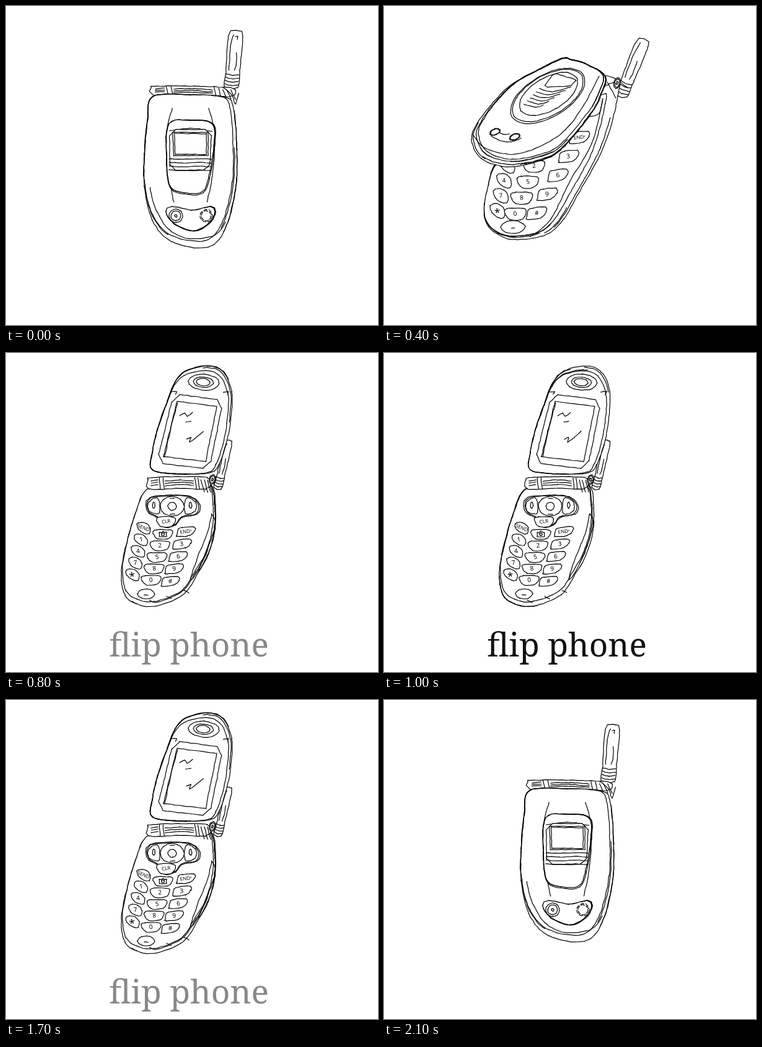
Recreate the animation shown at these times as an HTML page with a canvas. Size 600x514 px, loop 2.2 s.

```html
<!DOCTYPE html>
<html>
<head>
<meta charset="utf-8">
<style>
html, body { margin: 0; width: 100%; height: 100%; overflow: hidden; background: #fff; }
canvas { display: block; }
</style>
</head>
<body>
<canvas id="stage" width="600" height="514"></canvas>
<script>
const ctx = document.getElementById('stage').getContext('2d');
const LOOP = 2200, STEP = 100;
let seed = 1, matrix = new DOMMatrix();

const lerp = (a, b, t) => a + (b - a) * t;
function random() {
  seed = seed * 16807 % 2147483647;
  return seed / 2147483647;
}
const jitter = amount => (random() * 2 - 1) * amount;

// Samples a curve through flat x, y values; bend 0 keeps corners sharp.
function sample(p, closed, bend) {
  const n = p.length / 2, out = [];
  const at = (i, k) => p[(closed ? (i + n) % n : Math.max(0, Math.min(n - 1, i))) * 2 + k];
  for (let i = 0; i < (closed ? n : n - 1); i++) {
    const steps = Math.max(2, Math.round(Math.hypot(at(i + 1, 0) - at(i, 0), at(i + 1, 1) - at(i, 1)) / 6));
    for (let s = 0; s <= steps; s++) {
      const t = s / steps;
      out.push([0, 1].map(k => {
        const a = at(i, k), b = at(i + 1, k);
        const u = (b - at(i - 1, k)) / 2, v = (at(i + 2, k) - a) / 2;
        const arc = a + u * t + (3 * (b - a) - 2 * u - v) * t * t + (2 * (a - b) + u + v) * t ** 3;
        return lerp(lerp(a, b, t), arc, bend);
      }));
    }
  }
  return out;
}

function ink(points, closed) {
  ctx.setTransform(matrix);
  ctx.beginPath();
  for (const [x, y] of points) ctx.lineTo(x + jitter(.5), y + jitter(.5));
  if (closed) ctx.closePath();
  ctx.resetTransform();
  if (closed) ctx.fill();
  ctx.stroke();
}
const line = (...p) => ink(sample(p, false, 1), false);
const loop = (...p) => ink(sample(p, true, 1), true);
const poly = (...p) => ink(sample(p, true, 0), true);

const scaled = (points, k, [ax, ay]) => points.map(([x, y]) => [lerp(ax, x, k), lerp(ay, y, k)]);

// A thick shell: outline, an edge shrunk towards the first point, and loose pen strands between.
function shell(k, strands, ...p) {
  const edge = sample(p, true, 1), n = edge.length;
  ink(edge, true);
  ink(scaled(edge, k, edge[0]), true);
  for (let i = 0; i < strands; i++) {
    const from = Math.floor(random() * n), length = Math.floor(n * (.1 + random() * .2));
    const part = [...edge, ...edge].slice(from, from + length);
    ink(scaled(part, lerp(k, 1.005, random()), edge[0]), false);
  }
}

function oval(x, y, rx, ry = rx, turn = 0) {
  const p = [];
  for (let a = 0; a < 6.2; a += Math.PI / 4) {
    const u = rx * Math.cos(a), v = ry * Math.sin(a);
    p.push(x + u * Math.cos(turn) - v * Math.sin(turn), y + u * Math.sin(turn) + v * Math.cos(turn));
  }
  loop(...p);
}

// Four corners, enlarged about their centre, with corners cut by a share of each side.
function pane(corners, grow = 1, cut = 0) {
  const pts = [0, 2, 4, 6].map(i => corners.slice(i, i + 2));
  const mid = [0, 1].map(k => pts.reduce((sum, q) => sum + q[k], 0) / 4);
  const big = scaled(pts, grow, mid);
  poly(...big.flatMap((q, i) => {
    const prev = big[(i + 3) % 4], next = big[(i + 1) % 4];
    return cut ? [...scaled([prev, next], cut, q).flat()] : q;
  }));
}

function antenna(x0, y0, x1, y1, width) {
  const length = Math.hypot(x1 - x0, y1 - y0), ux = (x1 - x0) / length, uy = (y1 - y0) / length;
  const at = (t, side) => [x0 + ux * t * length - uy * side * width, y0 + uy * t * length + ux * side * width];
  loop(...at(0, -.5), ...at(.25, -.48), ...at(.9, -.5), ...at(1, -.2), ...at(1, .25), ...at(.92, .5), ...at(.3, .48), ...at(0, .4));
  line(...at(.93, -.15), ...at(.7, -.3), ...at(.3, -.28));
  line(...at(.62, .15), ...at(.4, .2), ...at(.3, .1));
  for (let t = .05; t < .25; t += .06) line(...at(t, -.5), ...at(t - .02, 0), ...at(t, .45));
}

function hinge(x0, y0, x1, y1, h) {
  const at = (t, v) => [lerp(x0, x1, t), lerp(y0, y1, t) + h * v];
  loop(...at(0, .15), ...at(.05, 0), ...at(.5, -.1), ...at(.95, 0), ...at(1, .5), ...at(.93, 1), ...at(.5, .95), ...at(.02, 1));
  for (const t of [.18, .24, .75, .8]) line(...at(t, 0), ...at(t + .02, 1));
  for (const v of [.3, .5, .7]) {
    line(...at(.27, v), ...at(.5, v - .1), ...at(.73, v));
    line(...at(.05, v), ...at(.16, v - .1));
  }
  for (const t of [.85, .9, .95]) line(...at(t, .2), ...at(t + .05, 1.3));
}

function knob(x, y, rx, ry) {
  for (const k of [1, .75, .3]) oval(x, y, rx * k, ry * k, .25);
}

const keyShapes = [
  [-.5, -.35, -.2, -.5, .2, -.4, .5, 0, .42, .5, 0, .45, -.4, .1],
  [-.5, -.3, -.3, -.48, .3, -.48, .5, -.3, .43, .2, .22, .5, -.25, .5, -.45, .1],
  [-.43, -.25, -.2, -.42, .46, -.5, .5, -.1, .2, .38, -.46, .5, -.5, .35]
];

function key(shape, x, y, w, h, label) {
  loop(...keyShapes[shape].map((v, i) => i % 2 ? y + v * h : x + v * w));
  if (label == 'camera') {
    poly(x - 6, y - 3, x - 2, y - 3, x, y - 5, x + 3, y - 3, x + 6, y - 3, x + 6, y + 4, x - 6, y + 4);
    oval(x, y, 2.2);
    return;
  }
  ctx.setTransform(matrix);
  ctx.translate(x + jitter(.5), y + (label == '*' ? 4 : 0));
  ctx.rotate(label == 'SEND' ? .4 : -.12);
  ctx.font = `500 ${label == '*' ? 17 : label.length > 1 ? 8 : 10}px "Noto Sans", sans-serif`;
  ctx.fillStyle = '#000';
  ctx.fillText(label, 0, 0);
  ctx.fillStyle = '#fff';
  ctx.resetTransform();
}

// Five rows of three keys between the places of the top row and those of the bottom row.
function keypad(top, bottom, w, h, firstRow = 0) {
  const labels = ['SEND', 'camera', 'ENDᵛ', ...'123456789*0#'];
  labels.forEach((label, i) => {
    const c = i % 3, row = (i - c) / 3;
    if (row < firstRow && c < 2) return;
    const [x, y] = [0, 1].map(k => lerp(top[c * 2 + k], bottom[c * 2 + k], row / 4));
    key(c, x, y, w * [.67, 1, .9][c], h * [1.15, .95, 1][c], label);
  });
}

function minusKey(x, y, w, h) {
  loop(x - w, y, x - w / 2, y - h, x + w / 2, y - h, x + w, y, x + w / 2, y + h, x - w / 2, y + h);
  line(x - 3, y + 2, x + 3, y + 2);
}

function navigation(x, y, w, h) {
  const shape = [-.95, -.1, -.8, -.8, 0, -1, .7, -.85, 1, -.1, .9, .7, .35, 1, .12, 1.7, -.3, 1.85, -.55, 1, -.85, .6];
  const edge = sample(shape.map((v, i) => i % 2 ? y + v * h : x + v * w), true, 1);
  ink(edge, true);
  ink(scaled(edge, .95, [x, y]), true);
  for (const side of [-1, 1]) {
    const at = (u, v) => [x + side * u * w, y + v * h];
    loop(...at(.84, -.4), ...at(.55, -.8), ...at(.45, -.3), ...at(.45, .5), ...at(.55, .7), ...at(.84, .4));
    oval(...at(.66, -.1), 2, 5);
    line(...at(.3, -.2), ...at(.3, .2));
  }
  oval(x, y, w * .43, h * .88);
  for (const v of [-.7, .7]) line(x - 3, y + v * h, x + 4, y + v * h);
  oval(x, y, w * .15, h * .36);
  key(1, x - w * .22, y + h * 1.38, w * .68, h * .9, 'CLR');
}

function earpiece(x, y, w, h) {
  for (const k of [1, .65, .45]) oval(x - 2 * (1 - k), y, w * k, h * k, .07);
}

function glints(x, y) {
  line(x, y, x + 8, y - 4, x + 12, y + 1, x + 21, y - 5);
  line(x + 10, y + 10, x + 18, y + 9);
  line(x + 11, y + 38, x + 18, y + 35, x + 16, y + 43, x + 27, y + 35, x + 38, y + 25);
}

const closed = {
  pivot: [295, 260],
  body() {
    antenna(364, 131, 371, 40, 23);
    line(370, 49, 374, 49, 373, 54);
    hinge(234, 129, 370, 132, 14);
    line(350, 131, 364, 143, 370, 158, 375, 140);
    shell(.955, 5, 237, 146, 228, 185, 223, 240, 223, 290, 236, 345, 268, 380, 325, 389, 354, 358,
      371, 290, 372, 220, 366, 160, 350, 146, 300, 143);
    for (const [x, side] of [[268, -1], [327, 1]]) line(x, 165, x + side * 9, 200, x + side * 9, 240, x + side * 3, 290, x - side * 3, 316);
    shell(.98, 5, 263, 190, 298, 184, 334, 190, 337, 225, 328, 278, 318, 301, 295, 304, 265, 293, 259, 240);
    line(264, 201, 298, 197, 333, 202);
    pane([264, 199, 332, 199, 328, 265, 264, 265], 1, .15);
    const screen = [269, 203, 326, 204, 326, 241, 270, 241];
    pane(screen);
    pane(screen, .9);
    for (let y = 246; y < 266; y += 6) line(263, y, 285, y + 1, 310, y, 331, y + 1);
    shell(.98, 3, 258, 331, 268, 323, 301, 329, 330, 323, 338, 331, 330, 349, 303, 363, 270, 350);
    for (const r of [11, 8, 2]) oval(274, 338, r);
    ctx.setLineDash([6, 3]);
    oval(323, 338, 10);
    oval(323, 338, 8);
    ctx.setLineDash([]);
    line(232, 292, 242, 328, 263, 360, 295, 375, 337, 369, 354, 348);
  },
  lid() {}
};

const half = {
  pivot: [350, 120],
  body() {
    antenna(383, 144, 419, 54, 21);
    shell(.9, 7, 162, 320, 164, 347, 180, 366, 205, 376, 240, 374, 268, 365, 290, 343, 312, 305,
      355, 225, 378, 140, 368, 124, 260, 180, 200, 230, 177, 258, 168, 290);
    line(353, 150, 335, 222, 300, 282, 268, 345, 235, 372);
    line(358, 112, 371, 116, 392, 131);
    line(360, 123, 374, 148);
    knob(376, 124, 5, 9);
    line(330, 178, 347, 173, 353, 149);
    keypad([204, 233, 252, 232, 315, 212], [183, 330, 212, 335, 246, 334], 35, 20, 1);
    minusKey(208, 356, 20, 9);
  },
  lid() {
    shell(.93, 16, 300, 86, 325, 93, 357, 113, 350, 143, 334, 174, 285, 232, 250, 250, 200, 259,
      157, 246, 141, 215, 150, 190, 172, 160, 205, 127, 250, 102, 288, 84);
    line(144, 208, 163, 229, 208, 239, 250, 227, 292, 200, 322, 160, 347, 113);
    for (const k of [1, .95, .78]) oval(264 + 6 * (1 - k), 145 - 15 * (1 - k), 67 * k, 34 * k, -.53);
    pane([274, 108, 311, 119, 301, 129, 258, 131], 1, .12);
    for (let i = 0; i < 6; i++) line(251 - i * 5, 133 + i * 5, 270 - i * 5, 138 + i * 5, 302 - i * 9, 130 + i * 6);
    line(172, 209, 185, 216, 205, 219, 221, 213);
    line(186, 204, 194, 207, 203, 206);
    for (const [x, y] of [[179, 203], [211, 211]]) for (const k of [1, .85]) oval(x, y, 9 * k, 5 * k, -.4);
  }
};

const wide = {
  pivot: [290, 176],
  body() {
    antenna(369, 195, 404, 110, 24);
    shell(.95, 9, 232, 176, 205, 225, 182, 260, 165, 295, 153, 345, 160, 380, 172, 397, 230, 407,
      275, 385, 315, 335, 350, 265, 357, 205, 345, 186, 290, 178);
    line(355, 233, 345, 262, 300, 337, 285, 367, 310, 342, 337, 293, 355, 233);
    hinge(230, 173, 354, 182, 10);
    knob(362, 180, 8, 14);
    navigation(274, 218, 54, 23);
    keypad([214, 253, 247, 269, 296, 270], [177, 342, 209, 355, 245, 364], 37, 20);
    minusKey(195, 381, 19, 8);
  },
  lid() {
    shell(.94, 12, 237, 169, 215, 140, 195, 105, 180, 75, 178, 52, 190, 33, 235, 20, 262, 28,
      300, 62, 325, 100, 355, 164, 348, 179, 300, 175);
    const screen = [201, 87, 269, 82, 333, 163, 243, 157];
    pane(screen, 1.13, .05);
    pane(screen);
    earpiece(231, 60, 26, 11);
    line(242, 93, 237, 105);
    line(272, 104, 263, 122, 250, 145);
    line(280, 111, 267, 127, 257, 144);
    line(273, 142, 278, 146, 285, 136);
  }
};

const open = {
  pivot: [285, 200],
  body() {
    antenna(342, 218, 359, 141, 13);
    shell(.96, 6, 230, 218, 208, 260, 190, 325, 186, 360, 192, 390, 210, 404, 240, 408, 285, 390,
      308, 357, 326, 325, 337, 285, 338, 245, 330, 212, 290, 205);
    line(332, 259, 337, 280, 314, 343, 298, 365, 307, 334, 324, 292, 332, 259);
    for (let x = 203; x < 290; x += 28) line(x, 400 - (x - 203) ** 2 / 400, x + 8, 404 - (x - 203) ** 2 / 400);
    hinge(229, 201, 330, 201, 18);
    knob(333, 204, 5, 8);
    navigation(268, 247, 45, 18);
    keypad([222, 282, 253, 292, 290, 288], [204, 357, 234, 366, 265, 368], 32, 16);
    minusKey(226, 388, 14, 7);
  },
  lid() {
    shell(.955, 5, 236, 188, 236, 160, 245, 120, 260, 78, 272, 48, 290, 29, 325, 21, 350, 30, 364, 62,
      362, 110, 354, 150, 343, 180, 329, 193, 280, 195);
    const screen = [276, 78, 340, 86, 322, 175, 254, 167];
    pane(screen, 1.25, .12);
    pane(screen);
    line(277, 80, 266, 121, 256, 167);
    earpiece(319, 47, 25, 13);
    for (const x of [266, 350]) line(x, 63, x + 9, 62, x + 7, 66);
    glints(280, 101);
  }
};

// Pose, whole turn in degrees, shift x, lid turn, lid height.
const poses = [
  [closed], [closed], [closed, 7, 6], [half, -3, 3, 0, 1.15], [half], [wide, 4, 8, 0, .6], [wide],
  [open, 0, 0, -10, 1.06],
  ...Array(10).fill([open]),
  [wide, 0, 8, 0, 1.06], [wide, 2, 17, 0, .6], [closed, 7, 6], [closed, 0, -2]
];

function draw(tick) {
  const [pose, turn = 0, shift = 0, lidTurn = 0, lidScale = 1] = poses[tick];
  const [px, py] = pose.pivot;
  seed = 4211 + (tick % 3) * 7919;
  ctx.globalAlpha = 1;
  ctx.fillStyle = '#fff';
  ctx.strokeStyle = '#000';
  ctx.lineWidth = 1.2;
  ctx.lineJoin = ctx.lineCap = 'round';
  ctx.textAlign = 'center';
  ctx.textBaseline = 'middle';
  ctx.fillRect(0, 0, 600, 514);
  matrix = new DOMMatrix().translate(px + shift, py).rotate(turn).translate(-px, -py);
  pose.body();
  matrix = matrix.translate(px, py).rotate(lidTurn).scale(1, lidScale).translate(-px, -py);
  pose.lid();
  ctx.globalAlpha = Math.max(0, Math.min(1, (tick - 7) / 2, (18 - tick) / 2));
  ctx.fillStyle = '#111';
  ctx.textBaseline = 'alphabetic';
  ctx.font = '53px Georgia, "Noto Serif", serif';
  ctx.fillText('flip phone', 295, 489);
}

const start = performance.now();
let shown = -1;
function run() {
  const tick = Math.floor((performance.now() - start) % LOOP / STEP);
  if (tick != shown) draw(shown = tick);
  requestAnimationFrame(run);
}
run();
</script>
</body>
</html>
```
